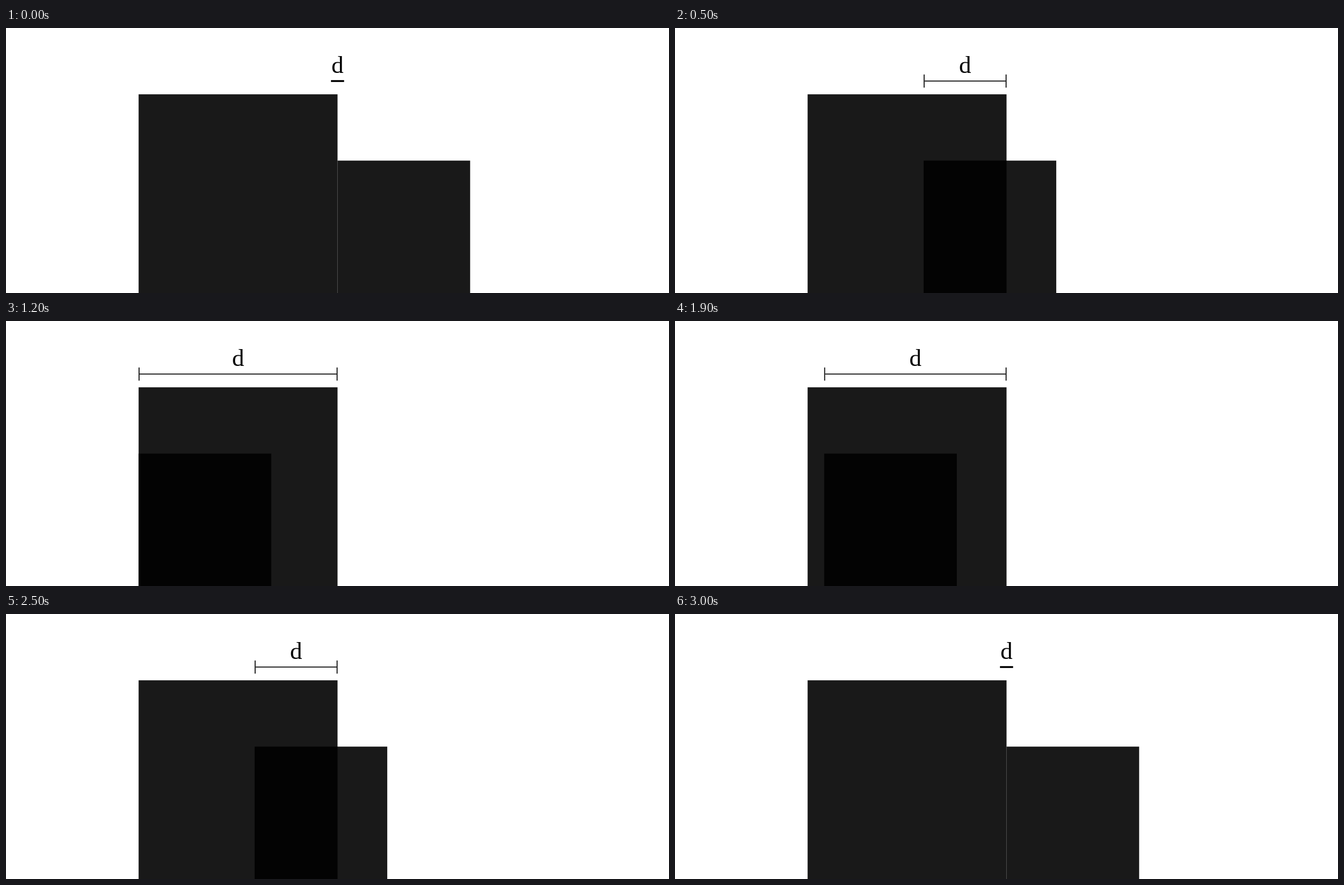
These frames come from a looping animation (1181 px wide and 472 px high, 3100 ms). An HTML page with a canvas:

```html
<!DOCTYPE html>
<html lang="en">
<head>
<meta charset="utf-8">
<title>Overlapping squares</title>
<style>
  html, body { margin: 0; width: 100%; height: 100%; overflow: hidden; background: #fff; }
  canvas { display: block; }
</style>
</head>
<body>
<canvas id="stage" width="1181" height="472"></canvas>
<script>
const ctx = document.getElementById('stage').getContext('2d');
const UNIT = 118.11;          // pixels per centimetre
const LINE = 1.66;            // stroke width of the measure
const TICK = 11.7;            // half length of an end tick
const RIGHT = 5 * UNIT;       // right edge of the large square
const MEASURE_Y = 0.8 * UNIT;
const LOOP = 3100, STEP = 100, STEPS = 12;

function square(x, size) {
  ctx.fillStyle = 'rgba(0, 0, 0, 0.9)';
  ctx.fillRect(x, 4 * UNIT - size, size, size);
}

function measure(left) {
  ctx.fillStyle = '#000';
  if (left === RIGHT) {
    // With no length, both ticks lie flat on each other.
    ctx.fillRect(RIGHT - TICK, MEASURE_Y - LINE, 2 * TICK, 2 * LINE);
  } else {
    ctx.fillRect(left + LINE, MEASURE_Y - LINE / 2, RIGHT - left - 2 * LINE, LINE);
    for (const x of [left, RIGHT - LINE]) {
      ctx.fillRect(x, MEASURE_Y - TICK, LINE, 2 * TICK);
    }
  }
  ctx.font = '43px "Liberation Serif", serif';
  ctx.textAlign = 'center';
  ctx.fillText('d', (left + RIGHT) / 2, 79.8);
}

function draw(now) {
  const tick = Math.floor((now % LOOP) / STEP);
  const step = Math.min(STEPS, tick, LOOP / STEP - 1 - tick);
  const left = RIGHT - step * 3 * UNIT / STEPS;
  ctx.clearRect(0, 0, 1181, 472);
  square(2 * UNIT, 3 * UNIT);
  square(left, 2 * UNIT);
  measure(left);
}

function frame() {
  draw(performance.now());
  requestAnimationFrame(frame);
}
frame();
</script>
</body>
</html>
```
